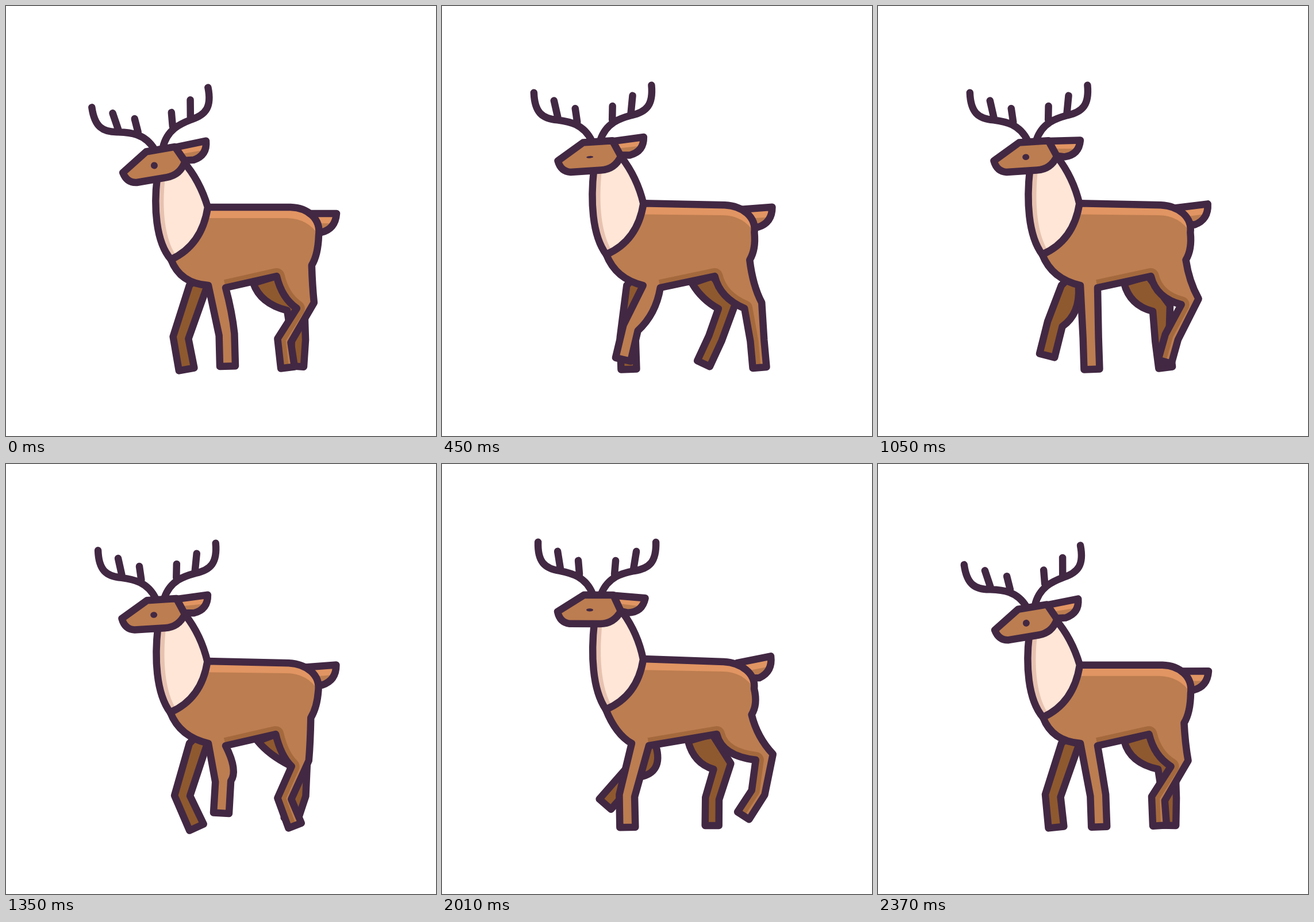
An HTML page with a canvas for the animation above (2400 ms loop, 748 px wide and 748 px high).

```html
<!DOCTYPE html>
<html lang="en">
<head>
<meta charset="utf-8">
<title>Walking deer</title>
<style>
  html, body { margin: 0; height: 100%; overflow: hidden; background: #fff; }
  canvas { display: block; }
</style>
</head>
<body>
<canvas id="stage" width="748" height="748"></canvas>
<script>
const ctx = document.getElementById('stage').getContext('2d');
const LINE = '#422843', COAT = '#bc7d50', SHADE = '#a4693d', FAR = '#8f592f',
      LIGHT = '#e19562', CREAM = '#ffe6d6', PINK = '#e7c2b0';
const CYCLE = 1200, STEP = 600;

// Half wave that is zero for the other half of the cycle; peak in degrees.
const pulse = (theta, peak) => Math.max(0, Math.cos(theta - peak * Math.PI / 180));

// Joints swing as sine waves plus a short reach; diagonal legs lift together.
function walk(theta) {
  const reach = pulse(theta, 220), early = pulse(theta, 80), late = pulse(theta, 260);
  const swing = (mid, cos, sin, extra) =>
    mid + cos * Math.cos(theta) + sin * Math.sin(theta) + extra * reach;
  const front = (hip, knee, foot, lift) =>
    legEdges([[hip, 488], [knee, 577 - lift], [foot, 632 - lift]], 13.5, 2, lift);
  const hind = (hock, ankle, foot, hockY, lift) =>
    legEdges([[hock, hockY - .65 * lift], [ankle, 582 - .6 * lift], [foot, 629 - lift]], 12, -5, lift);
  return {
    nearFront: front(367 - 24 * reach, swing(349.5, 34.5, 5.5, -8), swing(343.5, 42, 2, 0), 30 * early),
    farFront: front(334 + 25 * reach, swing(315, -11, -1, 12), swing(309.5, 4.5, 26.5, 0), 42 * late),
    nearHind: hind(swing(542.5, -21.5, -22, -12), swing(530.5, -46.5, -19, -20),
                   swing(526.5, -36.5, 2.5, -18), 521, 18 * late),
    farHind: hind(swing(494, 10, 11.5, 9), swing(484.5, 24.5, 11, 7),
                  swing(477.5, 28.5, -3.5, 2), 526, 12 * early)
  };
}

// Front and back outline of a leg, each from the upper joint to the foot.
function legEdges([[x, y], [kx, ky], [fx, fy]], half, slant, lift) {
  const across = (dx, dy) => {
    const r = half / Math.hypot(dx, dy);
    return [dy * r, -dx * r];
  };
  const [ax, ay] = across(fx - x, fy - y), [bx, by] = across(fx - kx, fy - ky);
  const side = s => [[x + 15 * s, y + slant * s], [kx + ax * s, ky + ay * s], [fx + bx * s, fy + by * s]];
  const front = side(-1), back = side(1);
  const bend = [(back[0][0] + back[1][0]) / 2 + .7 * lift, (back[0][1] + back[1][1]) / 2 + .5 * lift];
  return { front, back, bend, lift };
}

const down = edge => edge.join('L');
const up = edge => [...edge].reverse().join('L');

function paint(d, color, details) {
  const path = new Path2D(d);
  ctx.fillStyle = color;
  ctx.fill(path);
  if (details) {
    ctx.save();
    ctx.clip(path);
    details();
    ctx.restore();
  }
  ctx.stroke(path);
}

function fill(d, color) {
  ctx.fillStyle = color;
  ctx.fill(new Path2D(d));
}

function turned(x, y, degrees, draw) {
  ctx.save();
  ctx.translate(x, y);
  ctx.rotate(degrees * Math.PI / 180);
  ctx.translate(-x, -y);
  draw();
  ctx.restore();
}

function drawFarLegs({ farFront: f, farHind: h }) {
  paint(`M${down(f.front)}L${f.back[2]}L${f.back[1]}Q${f.bend} ${f.back[0]}L345,460Z`, FAR);
  paint(`M${428 + h.lift},482Q${438 + 2 * h.lift},${521 - 1.5 * h.lift} ` +
        `${down(h.front)}L${up(h.back)}L470,470Z`, FAR);
}

function drawTail(angle, u) {
  ctx.save();
  ctx.translate(0, 5 * (u - 1));
  turned(465, 365, -angle, () =>
    paint('M515,361L575,361Q573,388 548,394L525,390Z', COAT, () => fill('M500,350H590V378H500Z', LIGHT)));
  ctx.restore();
}

function drawBody({ nearFront: f, nearHind: h }, at, u) {
  const [hx, hy] = h.back[0];
  const waist = [532 + (hx - 537) * .17, 436 + 15 * u];
  const groin = [471 + (hx - 537) * .18, 470];
  const thigh = [groin[0] + 9, 508];
  const back = `M${at(350, 339, 351, 350)}L${at(490, 344, 495, 350)}` +
    `C${at(522, 346, 525, 351)} ${at(546, 365, 548, 370)} ${at(543, 391, 544, 399)}`;
  const outline = back +
    `Q${waist[0] + 11},${waist[1] - 18} ${waist}Q${waist[0] + (hx - waist[0]) * .25},${hy - 30} ` +
    `${down(h.back)}L${up(h.front)}Q${thigh} ${groin}` +
    `L${f.back[0]}Q${f.bend} ${f.back[1]}L${f.back[2]}L${up(f.front)}` +
    `Q${at(302, 470, 303, 483)} ${at(285, 427, 287, 441)}Z`;
  paint(outline, COAT, () => {
    fill(`${back}Q${at(523, 361, 525, 370)} ${at(488, 361, 490, 369)}L${at(335, 358, 335, 369)}Z`, LIGHT);
    ctx.strokeStyle = SHADE;
    ctx.lineWidth = 28;
    ctx.lineCap = 'butt';
    ctx.stroke(new Path2D(`M${f.back[0]}L${groin}Q${thigh} ${down(h.front)}`));
  });
}

function drawNeck(at) {
  const neck = `M${at(265, 275, 263, 298)}` +
    `C${at(259, 330, 257, 348)} ${at(261, 392, 260, 410)} ${at(285, 427, 287, 441)}` +
    `Q${at(340, 404, 341, 416)} ${at(350, 340, 351, 350)}Q${at(341, 295, 337, 303)} ${at(314, 258, 308, 270)}Z`;
  paint(neck, PINK, () => {
    for (let i = 0; i < 2; i++) {
      ctx.translate(14, 0);
      fill(neck, CREAM);
    }
  });
}

function drawHead(theta, u, earAngle) {
  ctx.save();
  ctx.translate(3 * u, 16 * u);
  turned(300, 270, -9.7 * u, () => {
    const antler = new Path2D('M262,226C250,196 225,190 205,186C178,182 166,170 167,136M237,168L239,192M201,152L206,183');
    ctx.stroke(antler);
    ctx.save();
    ctx.translate(539, 0);
    ctx.scale(-1, 1);
    ctx.stroke(antler);
    ctx.restore();
    turned(300, 235, earAngle, () =>
      paint('M298,229L353,227Q351,252 326,256L308,254Z', COAT, () => fill('M290,215H365V242H290Z', LIGHT)));
    paint('M201,257L247,228H298L311,256Q299,278 275,278H222Q205,276 201,257Z', COAT);
    ctx.beginPath();
    ctx.ellipse(257, 254, 6, 6 * (.6 + .4 * Math.cos(theta)), 0, 0, 7);
    ctx.fillStyle = LINE;
    ctx.fill();
  });
  ctx.restore();
}

function draw(now) {
  const t = now % CYCLE, theta = 2 * Math.PI * t / CYCLE, bob = Math.cos(2 * theta);
  const u = (bob + .588) / 1.588;               // 1 = body low, negative = raised
  const at = (x0, y0, x1, y1) => [x0 + (x1 - x0) * u, y0 + (y1 - y0) * u];
  const flap = (first, second) => (t < STEP ? first : second) * (1 - bob) / 2;
  const legs = walk(theta);

  ctx.clearRect(0, 0, 748, 748);
  ctx.strokeStyle = LINE;
  ctx.lineWidth = 12.5;
  ctx.lineCap = ctx.lineJoin = 'round';
  drawFarLegs(legs);
  drawTail(flap(8.6, 14.3), u);
  drawBody(legs, at, u);
  drawNeck(at);
  drawHead(theta, u, flap(-4, 8.5));
}

function loop() {
  draw(performance.now());
  requestAnimationFrame(loop);
}
loop();
</script>
</body>
</html>
```
